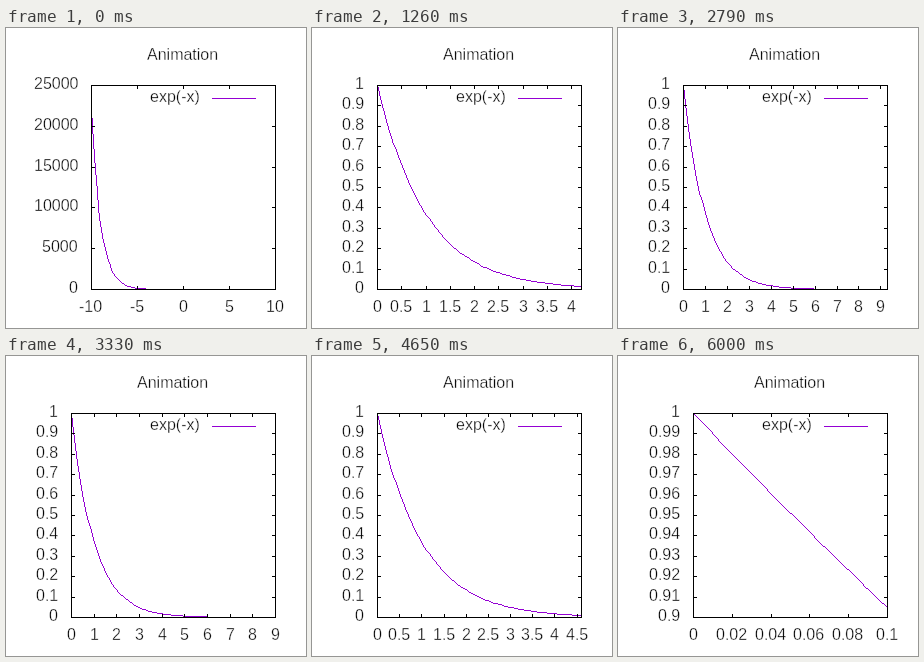
Recreate the animation shown at these times as an HTML page with a canvas. Size 300 by 300 pixels, loop 6030 ms.

```html
<!DOCTYPE html>
<html lang="en">
<head>
<meta charset="utf-8">
<title>Animation</title>
<style>
html, body { margin: 0; width: 100%; height: 100%; overflow: hidden; background: #fff; }
canvas { display: block; }
</style>
</head>
<body>
<canvas id="stage" width="300" height="300"></canvas>
<script>
const ctx = document.getElementById('stage').getContext('2d');
const STEP_MS = 30, STEPS = 201, SAMPLES = 100;
const TOP = 57, BOTTOM = 261, RIGHT = 269, TIC = 3;
const PURPLE = '#9400d3', EPS = 1e-9;

// Tic spacing of about 20 positions per decade, rounded to 1, 2 or 5
function ticStep(range) {
  const power = 10 ** Math.floor(Math.log10(range) + EPS);
  const norm = range / power;
  const density = 20 / norm - EPS;
  const rules = [[40, 0.05], [20, 0.1], [10, 0.2], [4, 0.5], [2, 1]];
  const rule = rules.find(([limit]) => density > limit);
  return (rule ? rule[1] : 2) * power;
}

function ticValues(min, max, step) {
  const values = [];
  const last = Math.floor(max / step + EPS);
  for (let k = Math.ceil(min / step - EPS); k <= last; k++) {
    values.push(Number((k * step).toPrecision(6)));
  }
  return values;
}

// Text with its start on a whole pixel; align: 0 left, 0.5 centre, 1 right.
// The white outline thins the strokes to about one pixel.
function text(str, x, y, align) {
  const start = Math.round(x - ctx.measureText(str).width * align);
  ctx.fillText(str, start, y);
  ctx.strokeText(str, start, y);
}

// Line without smoothing
function line(x0, y0, x1, y1) {
  const steep = Math.abs(y1 - y0) > Math.abs(x1 - x0);
  if (steep ? y0 > y1 : x0 > x1) [x0, y0, x1, y1] = [x1, y1, x0, y0];
  const length = steep ? y1 - y0 : x1 - x0;
  const minor = steep ? x1 - x0 : y1 - y0;
  for (let k = 0; k <= length; k++) {
    const shift = length
      ? Math.sign(minor) * Math.floor(Math.abs(minor) * k / length + 0.5) : 0;
    ctx.fillRect(x0 + (steep ? shift : k), y0 + (steep ? k : shift), 1, 1);
  }
}

function draw(n) {
  const xMin = n ? 0 : -10;
  const xMax = n ? Math.min(n, STEPS - n) / 10 : 10;
  const low = Math.exp(-xMax), high = Math.exp(-xMin);
  const yStep = ticStep(high - low);
  const yMin = Math.floor(low / yStep + EPS) * yStep;
  const yMax = Math.ceil(high / yStep - EPS) * yStep;
  const xTics = ticValues(xMin, xMax, ticStep(xMax - xMin));
  const yTics = ticValues(yMin, yMax, yStep);

  const left = 35 + 10 * Math.max(...yTics.map(v => String(v).length));
  const mapX = x => left + Math.floor((x - xMin) / (xMax - xMin) * (RIGHT - left) + 0.5);
  const mapY = y => BOTTOM - Math.floor((y - yMin) / (yMax - yMin) * (BOTTOM - TOP) + 0.5);

  ctx.fillStyle = '#fff';
  ctx.fillRect(0, 0, 300, 300);

  ctx.fillStyle = PURPLE;
  line(206, 70, 249, 70);
  let px, py;
  for (let i = 0; i < SAMPLES; i++) {
    const x = xMin + (xMax - xMin) * i / (SAMPLES - 1);
    const qx = mapX(x), qy = mapY(Math.exp(-x));
    if (i) line(px, py, qx, qy);
    [px, py] = [qx, qy];
  }

  ctx.fillStyle = '#000';
  ctx.strokeStyle = '#fff';
  ctx.lineWidth = 0.4;
  ctx.lineJoin = 'round';
  ctx.font = '16px "Liberation Sans", Arial, sans-serif';
  text('Animation', (left + RIGHT) / 2, 32, 0.5);
  text('exp(-x)', 194, 74, 1);

  line(left, TOP, RIGHT, TOP);
  line(left, BOTTOM, RIGHT, BOTTOM);
  line(left, TOP, left, BOTTOM);
  line(RIGHT, TOP, RIGHT, BOTTOM);
  for (const v of xTics) {
    const x = mapX(v);
    line(x, TOP, x, TOP + TIC);
    line(x, BOTTOM - TIC, x, BOTTOM);
    text(String(v), x, 284, 0.5);
  }
  for (const v of yTics) {
    const y = mapY(v);
    line(left, y, left + TIC, y);
    line(RIGHT - TIC, y, RIGHT, y);
    text(String(v), left - 13, y + 4, 1);
  }
}

const start = performance.now();
let shown = -1;
function tick() {
  const n = Math.floor((performance.now() - start) / STEP_MS) % STEPS;
  if (n !== shown) draw(shown = n);
  requestAnimationFrame(tick);
}
tick();
</script>
</body>
</html>
```
